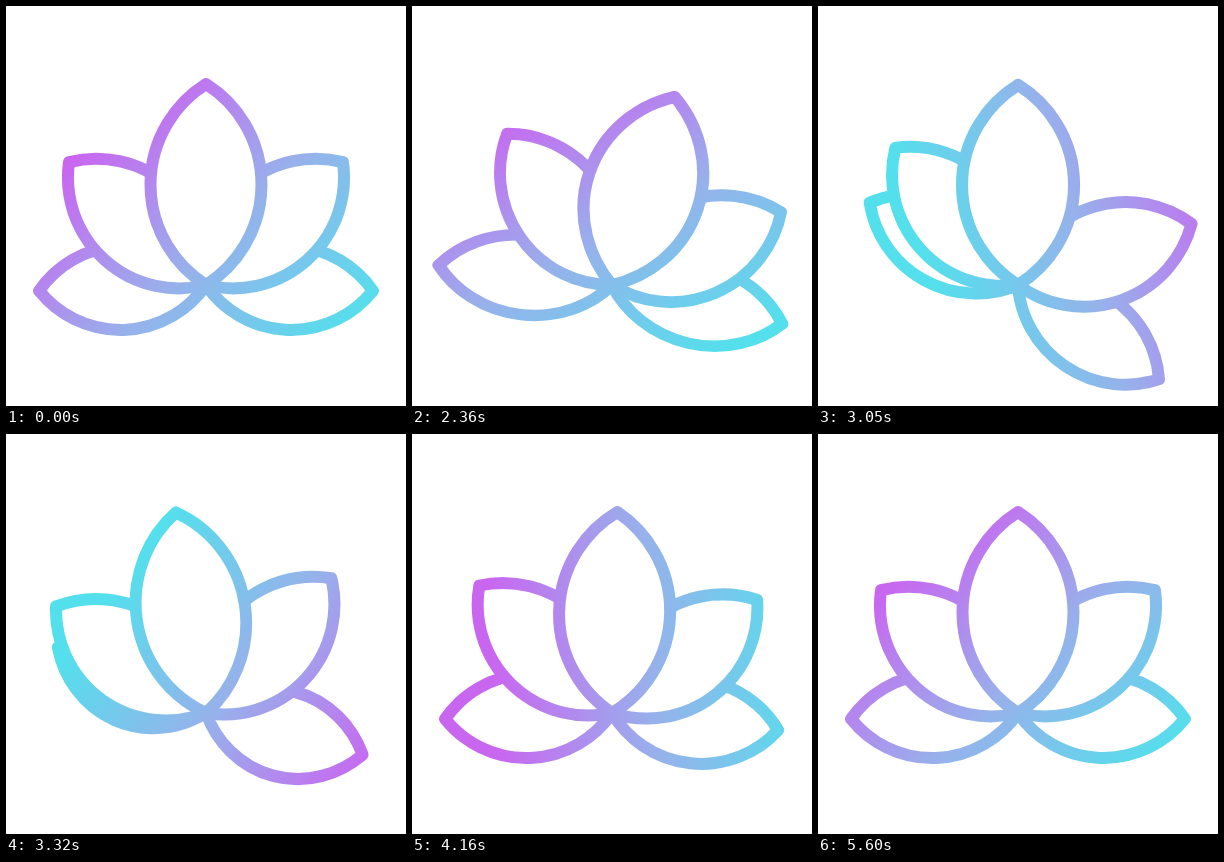
An HTML page for the animation above (5630 ms loop, 400 px wide and 400 px high).

```html
<!DOCTYPE html>
<html lang="en">
<head>
<meta charset="utf-8">
<title>Lotus</title>
<style>
  html, body { margin: 0; width: 100%; height: 100%; overflow: hidden; background: #fff; }
  svg { display: block; width: 100%; height: 100%; }
  .petal { fill: #000; stroke: #fff; stroke-width: 12; stroke-linejoin: round; }
  .tint {
    transform-origin: 248px 212px;
    animation: turn 5630ms linear infinite;
  }
  /* one turn between 2000 and 5000 ms */
  @keyframes turn {
    0%, 35.524% { transform: rotate(0deg); animation-timing-function: cubic-bezier(.33, 0, .55, 1); }
    88.81%, 100% { transform: rotate(360deg); }
  }
</style>
</head>
<body>
<svg viewBox="0 0 400 400">
  <defs>
    <linearGradient id="hue" gradientUnits="userSpaceOnUse" x1="128" y1="92" x2="354" y2="318">
      <stop offset="0" stop-color="#c966f0"/>
      <stop offset=".5" stop-color="#97b1eb"/>
      <stop offset="1" stop-color="#53e0ec"/>
    </linearGradient>
    <mask id="lotus" maskUnits="userSpaceOnUse" x="0" y="0" width="400" height="400"></mask>
  </defs>
  <g mask="url(#lotus)">
    <rect class="tint" x="-252" y="-288" width="1000" height="1000" fill="url(#hue)"/>
  </g>
</svg>
<script>
const LOOP = 5630;
const BEAT = 620;      // half a swing, ms
const DECAY = .58;     // each rebound against the one before
const REBOUNDS = 3;
const NS = 'http://www.w3.org/2000/svg';
const SINE = 'cubic-bezier(.37, 0, .63, 1)';

// Leaf shapes; long and wide are the change in scale at full squash
const low = { tilt: 92, length: 167, bulge: 42, long: .1, wide: -.115 };
const mid = { tilt: 48.1, length: 184, bulge: 49, long: 0, wide: -.04 };
const top_ = { tilt: 0, length: 201, bulge: 55.5, long: -.03, wide: .06 };

// Back to front; times in ms, peak and kick (first rebound) in degrees
const petals = [
  { ...low, side: -1, start: 2100, rise: 740, hold: 340, peak: 31, kick: 11 },
  { ...low, side: 1, start: 2060, rise: 760, hold: 200, peak: 32, kick: 8 },
  { ...mid, side: -1, start: 2050, rise: 640, hold: 0, peak: 28, kick: 6.5 },
  { ...mid, side: 1, start: 2050, rise: 640, hold: 110, peak: 39, kick: 8 },
  { ...top_, side: 1, start: 2000, rise: 630, hold: 0, peak: 30, kick: 9 }
];

function add(parent, tag, attrs) {
  const el = document.createElementNS(NS, tag);
  for (const key in attrs) el.setAttribute(key, attrs[key]);
  return parent.appendChild(el);
}

function leaf({ length, bulge }) {
  const r = (length * length / 4 + bulge * bulge) / (2 * bulge);
  return `M0 0A${r} ${r} 0 0 1 0 ${-length}A${r} ${r} 0 0 1 0 0Z`;
}

// Push to the peak, then rebound in ever smaller swings
function swing({ start, rise, hold, peak, kick }) {
  const crest = start + rise;
  const track = [[0, 0], [start, 0], [crest, peak], [crest + hold, peak]];
  for (let i = 1; i <= REBOUNDS; i++) {
    track.push([crest + hold + i * BEAT, kick * (-1) ** i * DECAY ** (i - 1)]);
  }
  const rest = crest + hold + (REBOUNDS + 1) * BEAT;
  return [...track, [Math.min(rest, LOOP), 0], [LOOP, 0]];
}

const squash = [[0, 0], [2030, 0], [2740, 1], [3260, -.3], [3880, 0], [LOOP, 0]];

function play(el, prop, track, format) {
  const frames = track.map(([time, v]) => ({ offset: time / LOOP, [prop]: format(v), easing: SINE }));
  el.animate(frames, { duration: LOOP, iterations: Infinity });
}

const mask = document.getElementById('lotus');
for (const petal of petals) {
  const { tilt, side, long, wide } = petal;
  const slot = add(mask, 'g', { transform: `translate(200 279) rotate(${side * tilt})` });
  const path = add(slot, 'path', { class: 'petal', d: leaf(petal) });
  play(path, 'rotate', swing(petal), a => `${a}deg`);
  play(path, 'scale', squash, s => `${1 + wide * s} ${1 + long * s}`);
}
</script>
</body>
</html>
```
